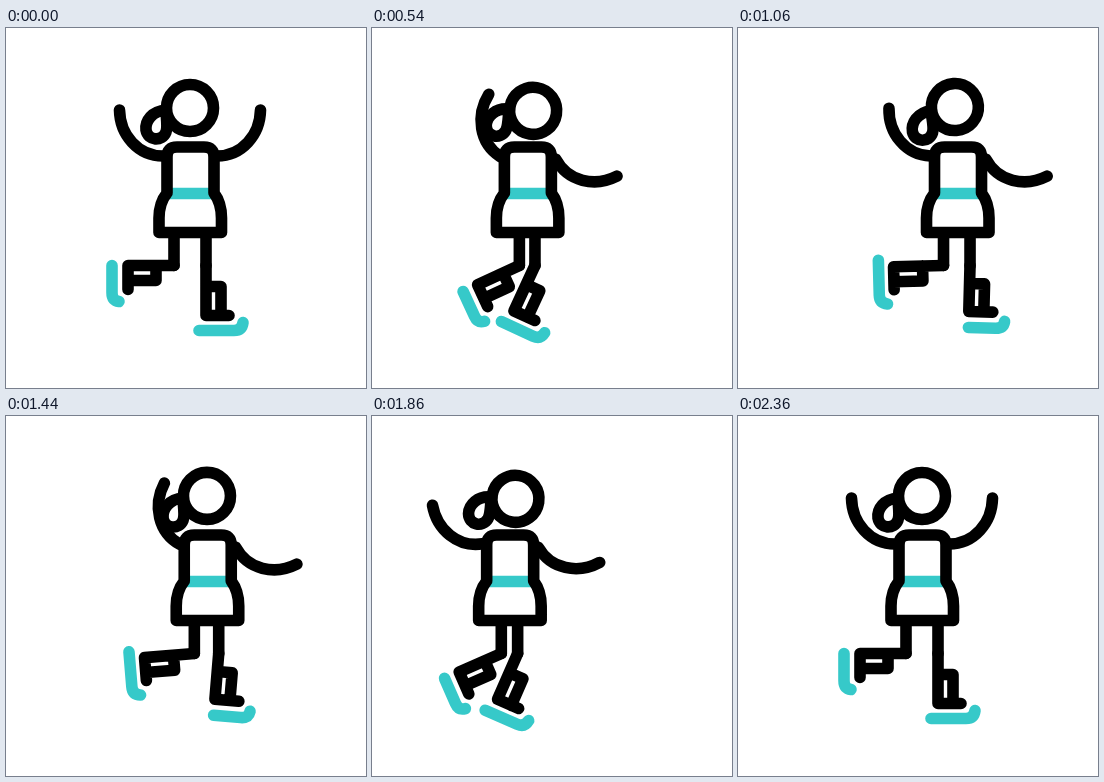
Recreate the animation shown at these times as an HTML page. Size 360 px wide and 360 px high, loop 2400 ms.

```html
<!DOCTYPE html>
<html lang="en">
<head>
<meta charset="utf-8">
<title>Figure skater</title>
<style>
  html, body { margin: 0; width: 100%; height: 100%; overflow: hidden; background: #fff; }
  svg { display: block; width: 100%; height: 100%; }
  svg * { stroke-linecap: round; stroke-linejoin: round; }
  .ink { stroke: #000; }
  .ice { stroke: #36c9c9; }
</style>
</head>
<body>
<svg viewBox="0 0 360 360" fill="none" stroke-width="11.6">
  <g id="skater">
    <g id="legB"><path class="ink" d="M0-30V0"/>
      <g id="shinB">
        <path class="ink" d="M0 0V50H23M0 21H15V50"/>
        <path class="ice" d="M-7 65H28Q36 65 37 57"/>
      </g>
    </g>
    <g id="legA"><path class="ink" d="M0-30V0"/>
      <g id="shinA">
        <path class="ink" d="M0 0V46H24M0 18H15V46"/>
        <path class="ice" d="M0 62H27Q35 62 36 55"/>
      </g>
    </g>
    <path id="armL" class="ink" d="M113.500 82C114 107 132 128 157 128"/>
    <path id="armR" class="ink" d="M254.500 82C254 107 236 128 211 128"/>
    <g id="head" class="ink">
      <path d="M160 82C146 83 139 93 140 102C142 113 156 114 160 104C162 99 160 88 160 82"/>
      <circle cx="184" cy="80" r="23.500"/>
    </g>
    <path class="ice" d="M164 165.500H205"/>
    <path class="ink" d="M161 165V129Q161 119 171 119H198Q208 119 208 129V165Q215.500 175 215.500 190V204.500H153V190Q153 175 161 165"/>
  </g>
</svg>
<script>
const LOOP = 2400;

const place = (id, transform) =>
  document.getElementById(id).setAttribute('transform', transform);

function placeLeg(name, hipX, bend) {
  place('leg' + name, `translate(${hipX} 237.5)`);
  place('shin' + name, `rotate(${bend})`);
}

function draw(t) {
  // Smooth step from 0 to 1 between two times.
  const ease = (from, to) => {
    const u = Math.min(1, Math.max(0, (t - from) / (to - from)));
    return u * u * (3 - 2 * u);
  };

  // Glide left, right, far left and home again.
  const slide = -29 * ease(0, 580) + 82 * ease(580, 1265)
    - 102 * ease(1196, 1810) + 49 * ease(1810, 2170);
  const tilt = 9 * ease(0, 520) - 14 * ease(580, 1160)
    + 14 * ease(1280, 1700) - 9 * ease(2040, 2240);
  const wave = 33 * ease(0, 520) - 33 * ease(560, 1160)
    + 29 * ease(1120, 1400) - 38 * ease(1440, 1800) + 9 * ease(2040, 2220);
  const reach = 62 * (ease(0, 540) - ease(1820, 2260));

  place('skater', `translate(${slide} 0)`);
  place('head', `rotate(${tilt} 169 118)`);
  place('armL', `rotate(${wave} 156 128)`);
  place('armR', `rotate(${reach} 209 131)`);

  // The legs trade places as the skater turns.
  const turn = ease(230, 1130) - ease(1330, 2130);
  placeLeg('A', 168 + 29 * turn, 90 * (1 - turn));
  placeLeg('B', 200 - 30.5 * turn, 90 * turn);
}

const start = performance.now();
function tick() {
  draw((performance.now() - start) % LOOP);
  requestAnimationFrame(tick);
}
tick();
</script>
</body>
</html>
```
